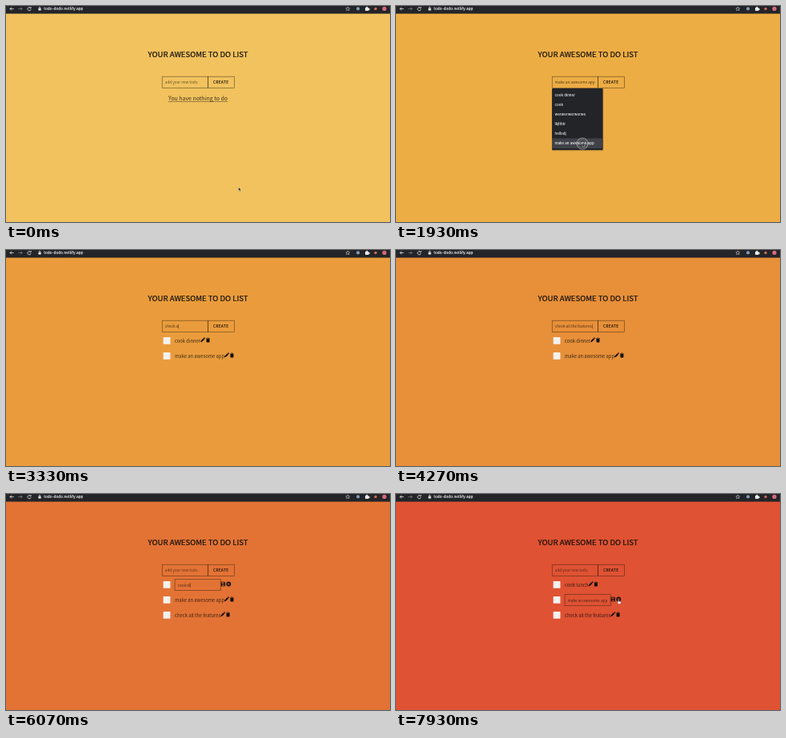
Write an HTML page that moves like this. It is 480 by 270 pixels and loops after 8000 ms.

```html
<!DOCTYPE html>
<html lang="en">
<head>
<meta charset="utf-8">
<title>To do list</title>
<style>
html, body { margin: 0; width: 100%; height: 100%; overflow: hidden; }
svg { display: block; width: 100vw; height: 100vh; }
text { font-family: "Noto Sans CJK JP", "Noto Sans CJK SC", "Noto Sans CJK", "Open Sans", sans-serif; white-space: pre; fill: #15110c; }
.ui { font-family: Inter, Roboto, sans-serif; font-weight: 500; fill: #f1f1f1; }
.title { font-size: 9.55px; text-anchor: middle; stroke: #15110c; stroke-width: .22; }
.empty { font-size: 6.95px; text-anchor: middle; fill-opacity: .8; }
.item { font-size: 5.8px; fill-opacity: .8; }
.field { font-size: 4.66px; fill-opacity: .75; }
.hint { fill-opacity: .62; }
.button { font-size: 4.6px; letter-spacing: .48px; stroke: #15110c; stroke-width: .12; }
.box { fill: none; stroke: #20180c; stroke-width: .6; stroke-opacity: .68; }
.line { fill: none; stroke: #e4e5e7; stroke-width: .8; }
</style>
</head>
<body>
<svg viewBox="0 0 480 270" preserveAspectRatio="none">
  <rect id="page" width="480" height="270"/>
  <g id="bar">
    <rect width="480" height="9.6" fill="#232529"/>
    <path class="line" d="M9.6 3.5H5M7 1.5l-2 2 2 2"/>
    <path class="line" d="M15.5 3.5h4.6M18.1 1.5l2 2-2 2" opacity=".45"/>
    <path class="line" d="M30.6 2.3a2.1 2.1 0 1 0 .5 1.8M31.2 1v1.7h-1.7"/>
    <path d="M40.5 3h3.2v2.6h-3.2z" fill="#e4e5e7"/>
    <path class="line" d="M41.2 3v-.8a.9.9 0 0 1 1.8 0V3"/>
    <text class="ui" x="47.3" y="5.3" font-size="4.65" style="font-weight:600">todo-dodo.netlify.app</text>
    <path class="line" style="stroke-width:.5" d="M427.3 1l.7 1.7 1.8.1-1.4 1.2.5 1.8-1.6-1-1.6 1 .5-1.8-1.4-1.2 1.8-.1z"/>
    <circle cx="440" cy="3.4" r="2.1" fill="#7f9db8"/>
    <path d="M449 2h1.4a.9.9 0 1 1 1.6 0h1.4v1.3a.9.9 0 1 1 0 1.5V6H449z" fill="#e8e8e8"/>
    <circle cx="462" cy="3.5" r="1.7" fill="#d66a4e"/>
    <circle cx="473" cy="3.4" r="2.6" fill="#d9687a"/>
  </g>
  <text class="title" x="240" y="64">YOUR AWESOME TO DO LIST</text>
  <g id="live"></g>
</svg>
<script>
const LOOP = 8000, STEP = 1000 / 15, MOVE = 330;
const page = document.getElementById('page'), live = document.getElementById('live');
const pen = document.createElement('canvas').getContext('2d');

const spot = {
  start: [302, 249], field: [226, 98], below: [221, 110], button: [282, 99.5], option: [233, 171.5],
  pencil: [246, 113], save: [270, 115.5], pencil2: [276, 131], cancel: [278, 132.5]
};
// when each thing is clicked
const at = { focus: 280, add1: 1110, menu1: 1590, pick: 1880, add2: 2390, menu2: 2650,
  add3: 4710, edit1: 5690, save1: 6980, edit2: 7460 };
const stops = [[at.focus, 'field'], [430, 'below'], [at.add1, 'button'], [at.menu1, 'field'],
  [at.pick, 'option'], [at.add2, 'button'], [at.menu2, 'field'], [at.add3, 'button'],
  [at.edit1, 'pencil'], [at.save1 - 70, 'save'], [at.edit2, 'pencil2'], [7820, 'cancel']];
const todos = [['cook dinner', at.add1], ['make an awesome app', at.add2], ['check all the features', at.add3]];
const history = ['cook dinner', 'cook', 'werwerwerwerwe', 'lkjlthtr', 'hellodj', 'make an awesome app'];

const between = (t, a, b) => t >= a && t < b;
const clamp = k => Math.max(0, Math.min(1, k));
const smooth = k => k * k * (3 - 2 * k);
const typed = (s, t, from, rate = 60) => s.slice(0, Math.max(0, Math.floor((t - from) / rate)));

function tint(k) {
  return [241 - 18 * k, 194 - 77 * k - 36 * k * k, 50 + 44 * Math.exp(-3.5 * k)].map(Math.round);
}

// Each stop pulls the pointer over from wherever it was.
function position(t) {
  return stops.reduce((p, [time, name]) => {
    const k = smooth(clamp((t - time + 30) / MOVE + 1));
    return p.map((v, n) => v + (spot[name][n] - v) * k);
  }, spot.start);
}

function width(s, size) {
  pen.font = '100px "Noto Sans CJK JP", "Noto Sans CJK SC", "Noto Sans CJK", "Open Sans", sans-serif';
  return pen.measureText(s).width * size / 100;
}

const text = (cls, x, y, s) => `<text class="${cls}" x="${x}" y="${y}">${s}</text>`;
const rect = (x, y, w, h, attrs) => `<rect x="${x}" y="${y}" width="${w}" height="${h}" ${attrs}/>`;
const icon = (x, y, d) => `<path transform="translate(${x} ${y})" d="${d}" fill="#130f0c" fill-rule="evenodd"/>`;
const caret = (x, y, s) => rect(x + width(s, 4.66) + .3, y - 4.3, .5, 5.3, 'fill="#15110c" opacity=".8"');

const PENCIL = 'M-2.8 2.8l.5-1.9 3.1-3.1 1.4 1.4-3.1 3.1zM1.2-2.6l.5-.5q.4-.3.8 0l.6.6q.3.4 0 .8l-.5.5z';
const TRASH = 'M-2.4-1.9v-.7H-.9l.4-.5H.5l.4.5h1.5v.7zM-2-1.4h4v3.7q0 .7-.7.7h-2.6q-.7 0-.7-.7z';
const SAVE = 'M-2.7-2.7h4.5l.9.9v4.5h-5.4zM-1.8-2v1.5h3V-2zM-1.5 .7v1.4h3V.7z';
const CANCEL = 'M0-2.9a2.9 2.9 0 1 1 0 5.8a2.9 2.9 0 1 1 0-5.8zM-1.4-.9l.9.9-.9.9.5.5.9-.9.9.9.5-.5-.9-.9.9-.9-.5-.5-.9.9-.9-.9z';
const ARROW = 'M0 0v4.2l1-.9.8 1.8.8-.4-.8-1.7h1.3z';
const HAND = 'M-.4 0q.6-.5 1 0v1.6l2 .5q.6.2.5.9l-.4 2h-2.6l-1.6-2q-.2-.7.6-.5l.5.4z';

const overButton = (x, y) => x > 253 && x < 286 && y > 88 && y < 103;
const menuOpen = t => between(t, at.menu1, 2000) || between(t, at.menu2, 2930);
const typing = t => between(t, 2930, 4300) || between(t, 5880, 6580);

function entry(t) {
  if (between(t, at.focus, at.add1)) return typed(todos[0][0], t, 300, 45);
  if (between(t, 1790, at.add2)) return todos[1][0];
  if (between(t, at.menu2, at.add3)) return typed(todos[2][0], t, 2900);
  return '';
}

function form(t, x, y) {
  const s = entry(t);
  const focus = between(t, at.focus, 900) || between(t, at.menu1, 1790) || between(t, at.menu2, 4350);
  return rect(195.2, 88.2, 57.3, 14.2, 'class="box"') +
    (overButton(x, y) ? rect(252.8, 88, 32.8, 14.6, 'fill="#e69d24" fill-opacity=".42"')
                      : rect(252.5, 88.2, 32.9, 14.2, 'class="box"')) +
    text(s ? 'field' : 'field hint', 198.8, 97.2, s || 'add your new todo') +
    (focus ? caret(198.8, 97.2, s) : '') + text('button', 259, 97.1, 'CREATE');
}

function row(y, s, edit, active) {
  const box = rect(196.6, y - 4.6, 8.8, 8.8, 'rx=".5" fill="#f6f1ed"');
  if (edit) {
    return box + rect(211, y - 6.8, 57.2, 14, 'class="box"') + text('field', 214.5, y + 2, s) +
      (active ? caret(214.5, y + 2, s) : '') + icon(271.3, y - 1, SAVE) + icon(278.3, y - 1, CANCEL);
  }
  const end = 211 + width(s, 5.8);
  return box + text('item', 211, y + 2, s) + icon(end + 2.8, y - 1, PENCIL) + icon(end + 9.4, y - 1, TRASH);
}

function revised(t) {
  const gone = typed('dinner', t, 5880, 40).length;
  return 'cook dinner'.slice(0, 11 - gone) + typed('lunch', t, 6130, 70);
}

function list(t) {
  if (t < at.add1) {
    return text('empty', 240, 118.4, 'You have nothing to do') +
      rect(203, 119.4, 74, .5, 'fill="#15110c" opacity=".8"');
  }
  const edits = [between(t, at.edit1, at.save1), t >= at.edit2];
  return todos.map(([s, born], i) =>
    t < born ? '' : row(113.5 + 19 * i, i ? s : revised(t), edits[i], t < 6600)).join('');
}

function menu(t, y) {
  if (!menuOpen(t)) return '';
  const hover = Math.floor((y - 105.5) / 12);
  return rect(194.6, 103.6, 64.6, 77.6, 'rx="1.2" fill="#000" opacity=".18"') +
    rect(195, 103, 63.6, 77, 'rx="1" fill="#222428"') +
    (hover >= 0 ? rect(195, 105.5 + 12 * hover, 63.6, 12.4, 'fill="#404247"') : '') +
    history.map((s, i) => `<text class="ui" x="198.5" y="${113.2 + 12 * i}" font-size="4.5">${s}</text>`).join('');
}

function pointer(t, x, y) {
  if (typing(t)) return '';
  const hand = overButton(x, y) || (t > at.edit1 - 100 && x > 244);
  const ring = Object.values(at).some(c => between(t, c, c + 140))
    ? `<g fill="none" stroke="#fff"><circle cx="${x}" cy="${y + .5}" r="7" stroke-width=".7" opacity=".7"/>` +
      `<circle cx="${x}" cy="${y + .5}" r="5" stroke-width=".5" opacity=".45"/></g>` : '';
  return ring + `<path transform="translate(${x} ${y})" d="${hand ? HAND : ARROW}" ` +
    `fill="${hand ? '#fff' : '#111'}" stroke="${hand ? '#222' : '#fff'}" stroke-width=".3"/>`;
}

function draw(now) {
  const t = Math.floor((now % LOOP + 4) / STEP) * STEP;
  const [x, y] = position(t);
  page.setAttribute('fill', `rgb(${tint(t / LOOP)})`);
  live.innerHTML = form(t, x, y) + list(t) + menu(t, y) + pointer(t, x, y);
}

let start;
function tick(now) {
  start ??= now;
  draw(now - start);
  requestAnimationFrame(tick);
}
draw(0);
requestAnimationFrame(tick);
</script>
</body>
</html>
```
